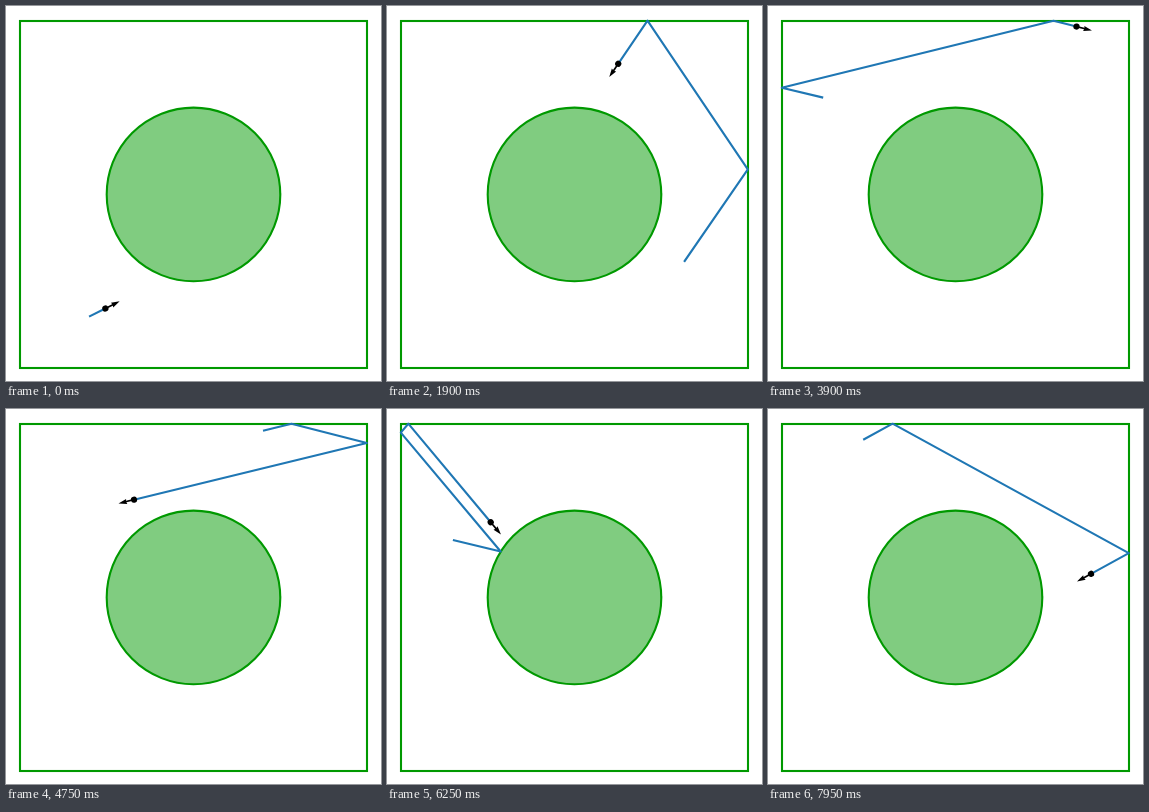
These frames come from a looping animation (375x375 px, 8000 ms). An HTML page with a canvas:

```html
<!DOCTYPE html>
<html lang="en">
<head>
<meta charset="utf-8">
<title>Billiard with a round obstacle</title>
<style>
  html, body { margin: 0; width: 100%; height: 100%; overflow: hidden; background: #fff; }
  canvas { display: block; width: 375px; height: 375px; }
</style>
</head>
<body>
<canvas id="stage"></canvas>
<script>
const SIZE = 375, LOOP = 8000, STEP = 50, TRAIL = 1000;
const canvas = document.getElementById('stage');
const ctx = canvas.getContext('2d');
const ratio = window.devicePixelRatio || 1;
canvas.width = canvas.height = Math.round(SIZE * ratio);
ctx.scale(ratio, ratio);

// Bounce points: time in ms, x, y
const L = 13.8, R = 360.8, T = 14.7, B = 361.6;
const path = [
  [-50, 84, 310.2], [203, 161.7, 271.3], [523, 224.3, B], [1224, R, 163.3],
  [1747, 260.5, T], [2058, 201, 102.3], [2327, 174.3, T], [2630, 144.3, 112.7],
  [3021, L, 81.8], [3832, 285.5, T], [4055, R, 33.9], [5091, L, 118.5],
  [5390, 113.7, 142.5], [5843, L, 23.6], [5877, 21.3, T], [6326, 120.5, 133.3],
  [6678, L, 75.2], [7044, 124.6, T], [7825, R, 144.2], [8050, 292.8, 181.4]
];

function locate(t) {
  let i = 0;
  while (i < path.length - 2 && path[i + 1][0] <= t) i++;
  const [t0, x0, y0] = path[i], [t1, x1, y1] = path[i + 1];
  const k = (t - t0) / (t1 - t0);
  return {
    x: x0 + (x1 - x0) * k,
    y: y0 + (y1 - y0) * k,
    angle: Math.atan2(y1 - y0, x1 - x0)
  };
}

function drawTable() {
  ctx.fillStyle = '#fff';
  ctx.fillRect(0, 0, SIZE, SIZE);
  ctx.strokeStyle = '#009900';
  ctx.lineWidth = 2.1;
  ctx.lineJoin = 'miter';
  ctx.strokeRect(14, 15, 347, 347);
  ctx.beginPath();
  ctx.arc(187.5, 188.4, 86.8, 0, Math.PI * 2);
  ctx.fillStyle = '#80cc80';
  ctx.fill();
  ctx.stroke();
}

function drawTrail(t, head) {
  const from = Math.max(path[0][0], t - TRAIL);
  const tail = locate(from);
  ctx.beginPath();
  ctx.moveTo(tail.x, tail.y);
  for (const [time, x, y] of path) {
    if (time > from && time < t) ctx.lineTo(x, y);
  }
  ctx.lineTo(head.x, head.y);
  ctx.strokeStyle = '#1f77b4';
  ctx.lineWidth = 2.1;
  ctx.lineCap = 'square';
  ctx.lineJoin = 'round';
  ctx.stroke();
}

function drawBall({ x, y, angle }) {
  ctx.save();
  ctx.translate(x, y);
  ctx.rotate(angle);
  ctx.fillStyle = '#000';
  ctx.beginPath();
  ctx.arc(0, 0, 3.1, 0, Math.PI * 2);
  ctx.fill();
  ctx.fillRect(0, -0.85, 9, 1.7);
  ctx.beginPath();
  ctx.moveTo(16, 0);
  ctx.lineTo(7.5, -2.6);
  ctx.lineTo(8.3, 0);
  ctx.lineTo(7.5, 2.6);
  ctx.fill();
  ctx.restore();
}

const start = performance.now();
function frame(now) {
  const t = Math.floor((Math.max(0, now - start) % LOOP) / STEP) * STEP;
  const head = locate(t);
  drawTable();
  drawTrail(t, head);
  drawBall(head);
  requestAnimationFrame(frame);
}
frame(start);
</script>
</body>
</html>
```
